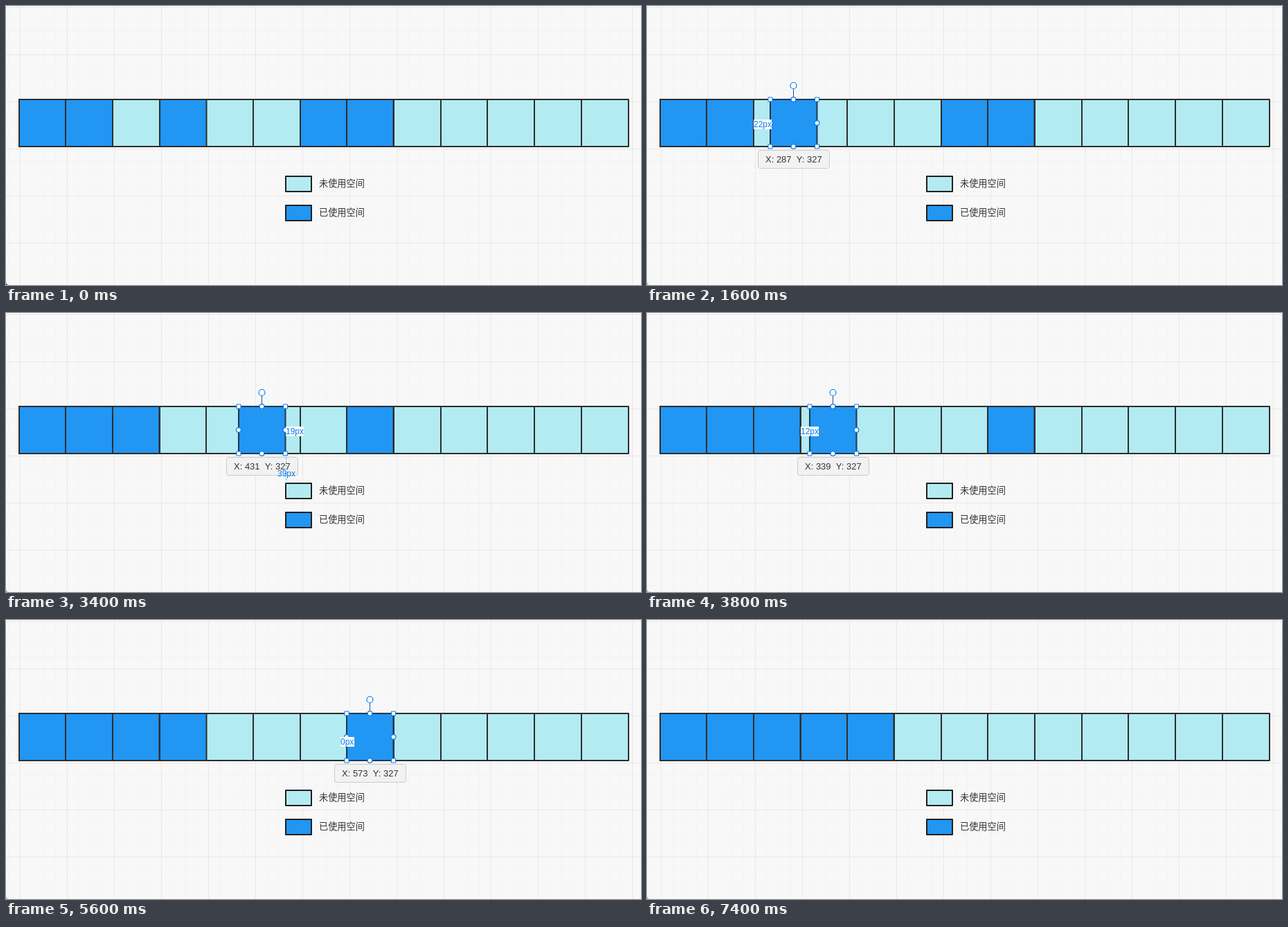
Recreate the animation shown at these times as an HTML page with a canvas. Size 917x403 px, loop 8200 ms.

```html
<!DOCTYPE html>
<html lang="zh">
<head>
<meta charset="utf-8">
<style>
  html, body { margin: 0; width: 917px; height: 403px; overflow: hidden; background: #f8f8f8; }
  canvas { display: block; }
</style>
</head>
<body>
<canvas id="stage" width="917" height="403"></canvas>
<script>
const ctx = document.getElementById('stage').getContext('2d');
const LOOP = 8200, TOP = 135, SIZE = 68, WIDTH = 67.5, SCALE = 1.097;
const USED = '#2196f3', FREE = '#b2ebf2', INK = '#2d2d2d', ACCENT = '#067bef';
const edges = Array.from({ length: 14 }, (_, i) => Math.floor(19 + 67.693 * i));

// Each block is selected, dragged in 100 ms steps and then left alone.
const drags = [
  { cell: 3, select: 800, tip: 800, start: 1300, end: 2200, tipEnd: 2200, deselect: 2900,
    xs: [220, 209, 194, 178, 171, 163, 157, 154] },
  { cell: 6, select: 2900, tip: 3300, start: 3300, end: 4000, tipEnd: 4700, deselect: 5200,
    xs: [421, 336, 302, 274, 251, 235, 224, 216, 216, 216, 222] },
  { cell: 7, select: 5200, tip: 5600, start: 5600, end: 6200, tipEnd: 6500, deselect: 7400,
    xs: [492, 452, 398, 340, 301, 293, 289] }
];
// [from, to, hovered cell]
const hovers = [
  [400, 500, 4], [500, 800, 3], [2300, 2400, 4], [2400, 2500, 5],
  [2500, 2900, 6], [4700, 4800, 6], [4800, 5200, 7]
];
// [from, to, gap start, gap end]
const spacings = [
  [2000, 2200, 222, 289], [2000, 2200, 357, 425],
  [4300, 4500, 289, 289], [4300, 4500, 357, 357],
  [4500, 4700, 154, 154], [4500, 4700, 222, 222],
  [6200, 6600, 222, 222], [6200, 6600, 289, 289]
];

const within = (t, from, to) => t >= from && t < to;
const pixels = length => Math.round(length / SCALE) + 'px';

function box(x, y, w, h, fill, stroke, line = 2) {
  ctx.fillStyle = fill;
  ctx.strokeStyle = stroke;
  ctx.lineWidth = line;
  ctx.lineJoin = 'round';
  ctx.beginPath();
  ctx.rect(x, y, w, h);
  ctx.fill();
  ctx.stroke();
}

function line(points, color, width = 1, dash = []) {
  ctx.strokeStyle = color;
  ctx.lineWidth = width;
  ctx.setLineDash(dash);
  ctx.beginPath();
  points.forEach(([x, y]) => ctx.lineTo(x, y));
  ctx.stroke();
  ctx.setLineDash([]);
}

function dot(x, y, r) {
  ctx.fillStyle = '#fff';
  ctx.strokeStyle = ACCENT;
  ctx.lineWidth = 1.2;
  ctx.beginPath();
  ctx.arc(x, y, r, 0, 7);
  ctx.fill();
  ctx.stroke();
}

function text(str, x, y, size, color, family = '"Liberation Sans", Arial, sans-serif') {
  ctx.font = `${size}px ${family}`;
  ctx.fillStyle = color;
  ctx.fillText(str, x, y);
}

function label(str, x, y, backed = true) {
  const w = str.length === 3 ? 20 : 26;
  if (backed) {
    ctx.fillStyle = '#fff';
    ctx.fillRect(x, y - 7, w, 14);
  }
  text(str, x, y + 4, 12, ACCENT);
}

function gap(a, b, arrows) {
  const y = TOP + 34.5, zero = b - a < 1;
  if (arrows) {
    line([[a, y], [b, y]], ACCENT);
    const heads = zero ? y - 3 : y;
    line([[a + 4, heads - 3], [a + 1, heads], [a + 4, heads + 3]], ACCENT);
    line([[b - 3, heads - 3], [b, heads], [b - 3, heads + 3]], ACCENT);
  }
  const x = zero ? a - 9 : Math.max(a, (a + b) / 2 - 13);
  label(pixels(b - a), x, zero ? 176 : 171);
}

function nearestGap(x) {
  const left = Math.max(...edges.filter(e => e <= x));
  const right = Math.min(...edges.filter(e => e >= x + WIDTH - 1));
  const end = x + SIZE;
  if (x - left <= right - end || right <= end) gap(left, x, x - left > 30);
  else gap(end, right, right - end > 30);
}

function anchors(x, y) {
  const cx = x + 33.5, cy = y + 34;
  [[cx, y], [x + WIDTH, cy], [cx, y + SIZE], [x, cy]].forEach(p => dot(...p, 3.4));
}

function selection(x, y) {
  ctx.strokeStyle = 'rgba(6,90,200,.45)';
  ctx.lineWidth = 1;
  ctx.strokeRect(x, y, WIDTH, SIZE);
  line([[x + 33.5, y - 16], [x + 33.5, y]], '#25508a');
  dot(x + 33.5, y - 20, 4.5);
  for (const hx of [x, x + WIDTH])
    for (const hy of [y, y + SIZE]) box(hx - 3, hy - 3, 6, 6, '#fff', ACCENT, 1);
  anchors(x, y);
}

function tooltip(x, y) {
  ctx.fillStyle = '#f2f2f2';
  ctx.strokeStyle = '#cbcbcb';
  ctx.lineWidth = 1;
  ctx.beginPath();
  ctx.roundRect(x - 17.5, y + 73.5, 103, 26, 3);
  ctx.fill();
  ctx.stroke();
  const px = Math.round(265 + (x - 154) / SCALE), py = Math.round(327 + (y - TOP) / SCALE);
  text(`X: ${px}  Y: ${py}`, x - 7, y + 91, 13, '#333');
}

function background(t) {
  ctx.fillStyle = '#f8f8f8';
  ctx.fillRect(0, 0, 917, 403);
  for (const [step, color] of [[17, '#f4f4f4'], [68, '#e8e8e8']]) {
    ctx.fillStyle = color;
    for (let x = 20 % step; x < 917; x += step) ctx.fillRect(x, 0, 1, 403);
    for (let y = 2; y < 403; y += step) ctx.fillRect(0, y, 917, 1);
  }
  ctx.fillStyle = t < 800 ? '#2b628f' : '#a9a9a9';
  ctx.beginPath();
  ctx.moveTo(0, 398);
  ctx.quadraticCurveTo(0, 403, 5, 403);
  ctx.lineTo(0, 403);
  ctx.fill();
}

function legend(y, color, name) {
  box(404, y, 37, 22, color, '#1f1f1f');
  text(name, 452, y + 15, 13.2, '#333', '"Noto Sans CJK SC", "Noto Sans CJK", sans-serif');
}

function place(drag, t) {
  const step = Math.floor((t - drag.start) / 100);
  drag.x = step < 0 ? edges[drag.cell] : drag.xs[Math.min(step, drag.xs.length - 1)];
  drag.y = within(t, 4000, 4300) && drag.cell === 6 ? TOP - 6 : TOP;
}

function draw(t) {
  background(t);
  legend(246, FREE, '未使用空间');
  legend(288, USED, '已使用空间');

  const cell = (i, color) => box(edges[i], TOP, edges[i + 1] - edges[i], SIZE, color, INK);
  for (let i = 0; i < 13; i++) cell(i, FREE);
  cell(0, USED);
  cell(1, USED);
  drags.forEach(d => place(d, t));
  const active = drags.find(d => within(t, d.select, d.deselect));
  for (const d of drags) if (d !== active) box(d.x, d.y, WIDTH, SIZE, USED, INK);
  if (active) {
    box(active.x, active.y, WIDTH, SIZE, USED, INK);
    selection(active.x, active.y);
  }

  for (const [from, to, i] of hovers) if (within(t, from, to)) anchors(edges[i], TOP);
  if (active) {
    if (within(t, active.tip, active.tipEnd)) tooltip(active.x, active.y);
    if (within(t, active.start, active.end)) nearestGap(active.x);
  }
  for (const [from, to, a, b] of spacings) if (within(t, from, to)) gap(a, b, true);

  if (within(t, 1700, 1800)) {
    line([[171.5, 0], [171.5, TOP]], ACCENT, 1, [3, 2]);
    label('211px', 154, 19);
  }
  if (within(t, 3400, 3500)) {
    line([[404.5, 204], [404.5, 246]], '#6bb2f5', 1, [3, 2]);
    label('39px', 392, 232, false);
  }
}

function tick() {
  draw(performance.now() % LOOP);
  requestAnimationFrame(tick);
}
tick();
</script>
</body>
</html>
```
